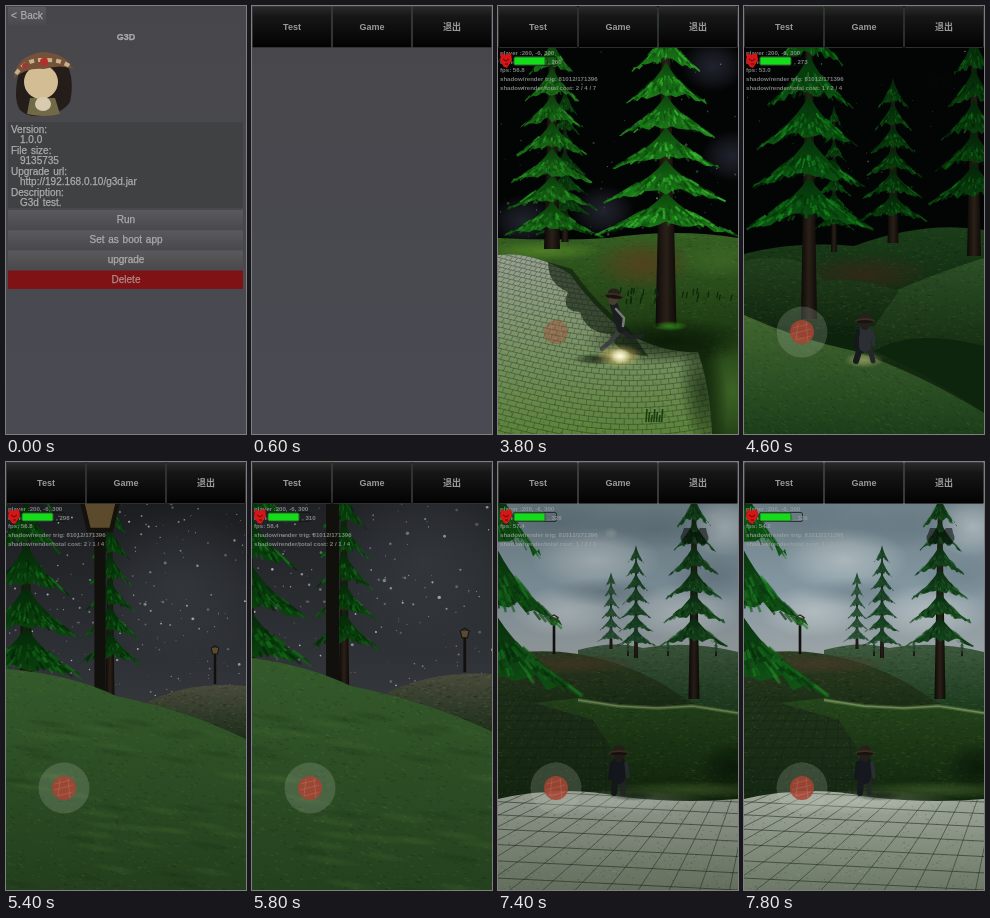
Write an HTML page with a canvas that moves like this. It is 240 by 428 pixels and loops after 8 s.

```html
<!DOCTYPE html>
<html lang="en">
<head>
<meta charset="utf-8">
<title>3D forest demo</title>
<style>
html, body { margin: 0; width: 100%; height: 100%; overflow: hidden; background: #48484e; }
canvas, svg { position: absolute; left: 0; top: 0; width: 100%; height: 100%; display: block; }
text { font-family: "Liberation Sans", Arial, sans-serif; white-space: pre; }
#menu text { font-size: 10px; word-spacing: 1px; fill: #acacae; stroke: #acacae; stroke-width: .25; }
#bar text { font: bold 9px "Liberation Sans", "Noto Sans CJK SC", "Noto Sans CJK", sans-serif; fill: #999; text-anchor: middle; }
#debug, #camera { font-size: 6.1px; font-weight: bold; fill: #a3a6a3; fill-opacity: .75; }
.mid { text-anchor: middle; }
</style>
</head>
<body>
<canvas id="scene" width="240" height="428"></canvas>
<svg viewBox="0 0 240 428">
  <defs>
    <linearGradient id="btn" x2="0" y2="1"><stop stop-color="#5a5a5d"/><stop offset="1" stop-color="#4a4a4d"/></linearGradient>
    <linearGradient id="tab" x2="0" y2="1"><stop stop-color="#2a2a2a"/><stop offset=".25" stop-color="#161616"/><stop offset="1" stop-color="#020202"/></linearGradient>
  </defs>
  <g id="menu">
    <rect x="2" y="1" width="38" height="18" rx="1" fill="url(#btn)"/>
    <text x="5" y="13">&lt; Back</text>
    <text x="120" y="34" class="mid" style="font-weight:bold;font-size:9px">G3D</text>
    <g id="doll">
      <path d="M14 62Q6 92 14 104Q24 113 38 109Q56 108 64 96Q69 72 60 57Z" fill="#251d1a"/>
      <path d="M24 92L49 92L54 108Q38 112 21 108Z" fill="#716a46"/>
      <ellipse cx="35" cy="76" rx="17" ry="17" fill="#d3bd94"/>
      <ellipse cx="37" cy="98" rx="8" ry="7" fill="#d9cbb0"/>
      <path d="M8 72Q10 50 36 46Q60 47 67 63Q55 58 38 63Q21 61 8 72Z" fill="#76513a"/>
      <path d="M10 68Q20 53 37 54Q54 53 65 61" fill="none" stroke="#c6b18a" stroke-width="4" stroke-dasharray="5 4"/>
      <circle cx="38" cy="56" r="4" fill="#b42e2b"/><circle cx="19" cy="60" r="3" fill="#9b3a32"/>
    </g>
    <rect x="2" y="116" width="235" height="86" fill="#404143"/>
    <g id="info"></g>
    <g id="buttons"></g>
  </g>
  <g id="hud">
    <g id="debug"></g>
    <rect x="15.5" y="50.5" width="43" height="9" rx="1.5" fill="none" stroke="#10160f" stroke-opacity=".7"/>
    <rect x="16" y="51" width="31" height="8" rx="1.5" fill="#14dc1b" stroke="#315b2e"/>
    <text id="camera" x="50" y="57.5"></text>
    <path d="M3 47L7 49L13 47L14 54L9 62L6 61L2 55Z" fill="#d51516"/>
    <path d="M5 53L8 55L11 53M7 58h3" stroke="#5d0909" fill="none"/>
    <g id="glass" fill="#050706" opacity=".55">
      <circle cx="189" cy="76" r="6.5"/><circle cx="204" cy="76" r="6.5"/><path d="M186 66h6l3 4h4l3-4h6l2 9h-27z"/>
    </g>
    <circle id="pad" cx="58" cy="326" r="25.5" fill="#b7beb0" fill-opacity=".22"/>
    <g id="knob">
      <circle cx="58" cy="326" r="12" fill="#a84332"/>
      <path d="M49 322L64 318M48 328L67 323M52 334L67 330M54 317L52 334M62 316L64 336" stroke="#d08070" stroke-opacity=".4"/>
    </g>
  </g>
  <g id="bar"></g>
</svg>
<script>
const $ = id => document.getElementById(id);
const ctx = $('scene').getContext('2d');

const random = seed => {
  let s = seed * 99991 + 17;
  return () => (s = s * 16807 % 2147483647) / 2147483647;
};

function fade(y0, y1, ...colors) {
  const g = ctx.createLinearGradient(0, y0, 0, y1);
  colors.forEach((c, i) => g.addColorStop(i / (colors.length - 1), c));
  return g;
}

function box(x, y, w, h, fill) {
  ctx.fillStyle = fill;
  ctx.fillRect(x, y, w, h);
}

function line(points, color, width = 1) {
  ctx.strokeStyle = color;
  ctx.lineWidth = width;
  ctx.beginPath();
  points.forEach(([x, y]) => ctx.lineTo(x, y));
  ctx.stroke();
}

function oval(x, y, rx, ry, color, tilt = 0) {
  ctx.fillStyle = color;
  ctx.beginPath();
  ctx.ellipse(x, y, rx, ry, tilt, 0, 7);
  ctx.fill();
}

// Soft-edged ellipse, colour given as "r,g,b"
function glow(x, y, rx, ry, rgb, alpha, tilt = 0) {
  ctx.save();
  ctx.translate(x, y);
  ctx.rotate(tilt);
  ctx.scale(rx, ry);
  const g = ctx.createRadialGradient(0, 0, 0, 0, 0, 1);
  g.addColorStop(0, `rgba(${rgb},${alpha})`);
  g.addColorStop(.5, `rgba(${rgb},${alpha * .6})`);
  g.addColorStop(1, `rgba(${rgb},0)`);
  ctx.fillStyle = g;
  ctx.fillRect(-1, -1, 2, 2);
  ctx.restore();
}

function stars(count, bottom, seed, bright) {
  const r = random(seed);
  for (let i = 0; i < count; i++) {
    const size = .4 + r() * r() * 1.2;
    oval(r() * 240, 42 + r() * (bottom - 42), size, size, `rgba(205,210,215,${bright * (.25 + r() * .75)})`);
  }
}

function inside(d, fill, paint) {
  const path = new Path2D(d);
  ctx.save();
  ctx.fillStyle = fill;
  ctx.fill(path);
  ctx.clip(path);
  paint();
  ctx.restore();
}

function grass(d, y0, y1, c0, c1, seed, lean = 0) {
  inside(d, fade(y0, y1, c0, c1), () => {
    const r = random(seed);
    for (let i = 0; i < 1300; i++) {
      const x = r() * 250 - 5, y = y0 + r() * (y1 - y0), len = 1 + r() * 3;
      line([[x, y], [x + len, y + lean * len]], r() > .5 ? 'rgba(0,10,0,.15)' : 'rgba(150,190,90,.09)', 1);
    }
  });
}

function paving(d, { y0, y1, c0, c1, rows, width, vanish = 120, power = 1.4, stagger = 0, bend = () => 0, slant = 0, ink = 'rgba(20,28,18,.38)' }) {
  inside(d, fade(y0, y1, c0, c1), () => {
    const rowY = k => y0 + (y1 - y0) * (k / rows) ** power;
    const grow = k => .45 + .55 * (k / rows) ** power;
    const column = (j, k) => vanish + j * width * grow(k) - slant * (k / rows) ** power;
    for (let k = 0; k <= rows; k++) {
      const pts = [];
      for (let x = -10; x <= 250; x += 10) pts.push([x, rowY(k) + bend(x)]);
      line(pts, ink, .9);
      const shift = stagger * (k % 2);
      for (let j = -50; j <= 50; j++) {
        const a = column(j + shift, k), b = column(j + shift, k + 1);
        if (a > -15 && a < 275) line([[a, rowY(k) + bend(a)], [b, rowY(k + 1) + bend(b)]], ink, .8);
      }
    }
    const r = random(rows);
    for (let i = 0; i < 900; i++)
      box(r() * 240, y0 - 20 + r() * (y1 - y0 + 20), 1.5, 1, r() > .5 ? 'rgba(230,240,215,.1)' : 'rgba(0,0,0,.16)');
  });
}

// Conifer: tapering trunk under overlapping, drooping skirts of needles
function tree({ x, top, low, base, half, tiers, trunk, hue = ['#0a3a0a', '#1b7219', '#30a42a'], seed = 1 }) {
  const r = random(seed), step = (low - top) / tiers;
  const g = ctx.createLinearGradient(x - trunk / 2, 0, x + trunk / 2, 0);
  ['#0b0907', '#2a2018', '#0d0a07'].forEach((c, i) => g.addColorStop(i / 2, c));
  ctx.fillStyle = g;
  ctx.beginPath();
  ctx.moveTo(x - trunk * .15, top); ctx.lineTo(x + trunk * .15, top);
  ctx.lineTo(x + trunk * .5, base); ctx.lineTo(x - trunk * .5, base);
  ctx.fill();
  for (let i = tiers; i >= 1; i--) {
    const y = top + step * i, h = step * 1.35, w = half * (.3 + .7 * i / tiers);
    const hem = u => y - h * .24 * (1 - u * u);
    // A needle bough hanging outwards from the spine
    const bough = (u, s) => [x + u * w * s, y - h + (hem(u) - y + h) * s ** .75];
    ctx.beginPath();
    ctx.moveTo(x, y - h);
    ctx.quadraticCurveTo(x - w * .25, y - h * .5, x - w * .92, y - h * .06);
    for (let u = -.88; u <= .88; u += .11) ctx.lineTo(x + u * w, hem(u) + (r() - .7) * h * .16);
    ctx.lineTo(x + w * .92, y - h * .06);
    ctx.quadraticCurveTo(x + w * .25, y - h * .5, x, y - h);
    ctx.fillStyle = fade(y - h, y, hue[0], hue[1]);
    ctx.fill();
    const count = 30 + w * 1.6;
    for (let j = 0; j < count; j++) {
      const u = r() * 2 - 1, s = .3 + r() * .6;
      ctx.globalAlpha = .25 + r() * .45;
      line([bough(u, s), bough(u, s + .14)], hue[Math.floor(r() * 3)], .7 + w / 45);
    }
    ctx.globalAlpha = 1;
  }
}

function lamp(x, top, base, s) {
  box(x - s, top, s * 2, base - top, '#11100d');
  ctx.fillStyle = '#5b4b2c';
  ctx.beginPath();
  [[-3, -5], [3, -5], [2, 0], [-2, 0]].forEach(([a, b]) => ctx.lineTo(x + a * s, top + b * s));
  ctx.fill();
  line([[x - 3.2 * s, top - 5 * s], [x - 2 * s, top], [x + 2 * s, top], [x + 3.2 * s, top - 5 * s], [x, top - 7 * s], [x - 3.2 * s, top - 5 * s]], '#15120e', s * .8);
}

function hat(x, y, tilt = 0) {
  oval(x, y - 3, 6, 4.5, '#28211b', tilt);
  oval(x, y, 10, 2.8, '#3c3025', tilt);
  oval(x, y + .8, 8.5, 1.8, '#18130f', tilt);
}

function runner(swing) {
  const lean = 4 * Math.max(0, swing - .5), hip = [121 + lean, 323], neck = [118 - lean, 299];
  glow(100, 353, 26, 6, '0,8,0', .7);
  ctx.lineCap = ctx.lineJoin = 'round';
  line([hip, [123 + 9 * swing, 334 - 3 * swing], [124 + 20 * swing, 346 - 16 * swing]], '#202226', 4.5);
  line([hip, [119 - 7 * swing, 336], [119 - 15 * swing, 349 - 6 * swing]], '#3c3f40', 4.5);
  line([neck, hip], '#1c1d21', 8);
  line([[neck[0] + 2, 303], [124 + lean, 312], [118 + 7 * swing, 320]], '#777b78', 2.5);
  oval(neck[0] - 1, 294, 4.5, 5, '#4b3d31');
  hat(neck[0], 290, .12);
  ctx.lineCap = 'butt';
}

function walker(y, coat, stride = 0) {
  ctx.lineCap = ctx.lineJoin = 'round';
  line([[117, y - 18], [116 - stride, y - 2]], '#16191d', 6);
  line([[125, y - 18], [125 + stride, y - 2]], '#24272a', 5);
  line([[121, y - 33], [121, y - 17]], coat, 12);
  line([[114, y - 32], [112, y - 17]], '#14171b', 4);
  line([[128, y - 32], [130, y - 18]], '#2b2f35', 3.5);
  oval(121, y - 39, 5, 6, '#241e19');
  hat(121, y - 42);
  ctx.lineCap = 'butt';
}

function courtyard({ swing, flash }) {
  box(0, 0, 240, 428, '#030404');
  [[105, 205], [235, 150], [25, 215], [215, 60]].forEach(([x, y]) => glow(x, y, 32, 26, '75,82,105', .4));
  stars(75, 235, 4, .5);
  grass('M0 232Q60 235 110 232Q180 222 240 232V428H0Z', 228, 350, '#355f22', '#18330f', 5);
  glow(145, 258, 50, 26, '88,62,28', .85);
  glow(222, 255, 45, 20, '75,120,45', .4);
  tree({ x: 67, top: 90, low: 231, base: 236, half: 32, tiers: 7, trunk: 7, hue: ['#06260a', '#0d430f', '#186119'], seed: 9 });
  glow(45, 245, 60, 10, '95,150,40', .6);
  glow(235, 385, 35, 60, '80,125,50', .65);
  paving('M0 249Q36 245 72 268Q92 297 125 325Q165 348 200 346Q212 380 214 428H0Z',
    { y0: 235, y1: 430, c0: '#9ba396', c1: '#5a8239', rows: 38, width: 10, stagger: .5, power: 1.1, slant: 20, bend: x => 22 * Math.sin(x / 85) });
  inside('M50 256L74 263Q98 298 130 322L150 350Q118 349 112 328Q88 327 82 306Q62 305 70 286Q50 278 50 256Z', 'rgba(14,26,12,.62)', () => {});
  glow(170, 335, 85, 24, '6,18,4', .75);
  glow(205, 385, 24, 62, '12,28,8', .65, -.12);
  tree({ x: 54, top: 16, low: 232, base: 243, half: 53, tiers: 8, trunk: 16, seed: 2 });
  tree({ x: 168, top: 2, low: 230, base: 321, half: 73, tiers: 7, trunk: 21, hue: ['#0b440b', '#1e841c', '#3cbc32'], seed: 3 });
  glow(172, 320, 18, 5, '50,150,25', .8);
  const r = random(12);
  for (let i = 0; i < 26; i++) {
    const x = r() * 125 + 110, y = 287 + r() * 12;
    line([[x, y], [x + 1, y - 6]], '#0b280a', 1.3);
  }
  for (let i = 0; i < 7; i++) line([[148 + i * 2.6, 416], [149 + i * 2.6, 403 + i % 3 * 3]], '#153c0e', 1.5);
  runner(swing);
  if (flash) {
    glow(121, 350, 24, 12, '235,200,110', .7);
    glow(122, 350, 11, 8, '255,255,225', 1);
  }
}

function woods() {
  const dim = ['#042208', '#0a430d', '#137019'];
  box(0, 0, 240, 428, '#030504');
  stars(40, 200, 8, .5);
  grass('M0 248Q50 235 110 240Q180 214 240 224V428H0Z', 222, 330, '#1b3d19', '#0c220c', 3);
  tree({ x: 90, top: 105, low: 225, base: 246, half: 22, tiers: 7, trunk: 6, hue: dim, seed: 5 });
  glow(120, 268, 70, 20, '52,40,24', .85);
  grass('M120 300Q165 276 240 252V428H120Z', 252, 360, '#2c5026', '#12280f', 11);
  grass('M0 255Q60 243 80 275Q110 270 155 285L130 320H0Z', 248, 330, '#23411d', '#0f240e', 10);
  tree({ x: 149, top: 80, low: 217, base: 237, half: 38, tiers: 6, trunk: 11, hue: dim, seed: 6 });
  tree({ x: 230, top: 40, low: 200, base: 250, half: 50, tiers: 5, trunk: 14, hue: dim, seed: 14 });
  tree({ x: 65, top: -20, low: 226, base: 313, half: 70, tiers: 6, trunk: 16, hue: ['#05300a', '#0c5711', '#189020'], seed: 7 });
  grass('M0 309Q50 332 110 345Q175 367 240 407V428H0Z', 309, 428, '#41662f', '#1c3f1a', 12, .5);
  inside('M130 345Q170 322 240 340V406Q180 366 130 345Z', '#0d250c', () => {});
  glow(120, 354, 20, 8, '190,185,125', .6);
  walker(357, '#2b2f34', 4);
}

function hillside() {
  box(0, 0, 240, 428, fade(42, 240, '#1b1d21', '#33363a'));
  glow(175, 125, 90, 80, '75,80,85', .35);
  stars(240, 240, 21, .8);
  const dim = ['#052508', '#0b470f', '#157019'];
  tree({ x: 104, top: 20, low: 204, base: 235, half: 34, tiers: 7, trunk: 9, hue: dim, seed: 15 });
  grass('M143 239Q185 219 240 224V280H143Z', 220, 280, '#4b4d3d', '#1a2b18', 16);
  lamp(209, 192, 222, 1.2);
  tree({ x: 20, top: 10, low: 221, base: 240, half: 66, tiers: 5, trunk: 14, hue: dim, seed: 8 });
  lamp(94, 68, 235, 5.6);
  grass('M0 207Q65 212 110 234Q180 248 240 277V428H0Z', 207, 428, '#345a2b', '#233f1d', 17, .35);
  const r = random(24);
  for (let i = 0; i < 45; i++) glow(r() * 240, 260 + r() * 168, 25, 4, r() > .5 ? '85,125,55' : '8,30,8', .18, .15);
}

function valley({ day, drift = 0, stride = 0 }) {
  const storm = .2 + .45 * (1 - day);
  box(0, 0, 240, 428, fade(42, 205, '#6d7f87', '#8397a1', '#a0a5a6'));
  [[100, 98, 65, 32], [185, 150, 60, 28], [70, 150, 55, 26], [228, 65, 40, 30]].forEach(([x, y, a, b]) => glow(x + drift, y, a, b, '200,208,210', .6));
  [[60, 62, 85, 24], [160, 67, 70, 22], [110, 130, 55, 15], [220, 115, 50, 25]].forEach(([x, y, a, b]) => glow(x + drift * 1.5, y, a, b, '62,78,90', storm));
  glow(115 + drift, 71, 7, 6, '245,245,235', .8 * (1 - day));
  grass('M80 188Q115 178 145 186Q190 178 240 190V250H80Z', 180, 250, '#3f5a40', '#1b3a1c', 30);
  const far = ['#23442f', '#2c5637', '#3d6b44'];
  [[130, 178, 3], [170, 180, 3], [218, 182, 4]].forEach(([x, top, half], i) => tree({ x, top, low: 190, base: 194, half, tiers: 3, trunk: 2, hue: far, seed: 40 + i }));
  tree({ x: 113, top: 114, low: 180, base: 187, half: 14, tiers: 6, trunk: 3, hue: far, seed: 31 });
  tree({ x: 138, top: 88, low: 185, base: 196, half: 21, tiers: 7, trunk: 4, hue: ['#143820', '#1f4c2a', '#2e6637'], seed: 32 });
  grass('M0 193Q60 183 110 199Q155 212 190 239L240 260V290H0Z', 188, 265, '#2f3d24', '#12270f', 33);
  glow(75, 202, 70, 10, '74,56,38', .7);
  lamp(56, 162, 192, 1.3);
  grass('M80 236Q145 250 190 244Q215 246 240 250V345H0V245Z', 238, 335, '#24451b', '#12260d', 34);
  [[4, .25], [1.6, .55]].forEach(([width, alpha]) =>
    line([[80, 238], [120, 244], [160, 246], [195, 244], [240, 251]], `rgba(150,175,115,${alpha})`, width));
  paving('M0 232Q35 240 95 258L145 336H0Z', { y0: 230, y1: 340, c0: '#20331a', c1: '#142711', rows: 13, width: 18, slant: -25 });
  glow(235, 305, 35, 26, '5,20,5', .7);
  tree({ x: 196, top: 18, low: 186, base: 237, half: 37, tiers: 7, trunk: 11, hue: ['#0a2811', '#184c1f', '#256b2c'], seed: 35 });
  tree({ x: -6, top: 30, low: 240, base: 330, half: 100, tiers: 3, trunk: 12, hue: ['#08300d', '#125817', '#1f8023'], seed: 36 });
  glow(190, 328, 90, 9, '70,100,45', .6);
  paving('M0 337Q65 322 125 335Q185 342 240 337V428H0Z',
    { y0: 318, y1: 440, c0: '#a7aea3', c1: '#66735f', rows: 9, width: 32, vanish: 195, power: 1.35, slant: 95, bend: x => (x - 120) * .05, ink: 'rgba(22,34,20,.6)' });
  glow(115, 340, 100, 12, '205,212,200', .35);
  glow(135, 334, 24, 5, '0,10,0', .5);
  walker(333, '#15191f', stride);
  box(0, 42, 240, 386, `rgba(5,9,8,${.4 * (1 - day)})`);
}

const steps = [
  { at: 0, menu: true },
  { at: 600, loading: true },
  { at: 2600, draw: courtyard, swing: .72, fps: '34.8', cost: '1 / 1 / 3', cam: 260 },
  { at: 3000, draw: courtyard, swing: -.35, fps: '48.2', cost: '2 / 2 / 5', cam: 260 },
  { at: 3400, draw: courtyard, swing: .5, fps: '52.4', cost: '1 / 3 / 5', cam: 260 },
  { at: 3800, draw: courtyard, swing: 1, flash: true, fps: '56.8', cost: '2 / 4 / 7', cam: 260 },
  { at: 4200, draw: woods, zoom: 1.12, pan: 12, fps: '55.2', cost: '1 / 2 / 5', cam: 266 },
  { at: 4600, draw: woods, fps: '53.0', cost: '1 / 2 / 4', cam: 273 },
  { at: 5000, draw: woods, zoom: 1.18, pan: -18, fps: '54.6', cost: '2 / 2 / 4', cam: 285 },
  { at: 5400, draw: hillside, fps: '56.8', cost: '2 / 1 / 4', cam: 298 },
  { at: 5800, draw: hillside, zoom: 1.15, pan: -16, fps: '58.4', cost: '2 / 1 / 4', cam: 310 },
  { at: 6200, draw: valley, day: .05, drift: -12, stride: 3, zoom: 1.1, pan: 10, fps: '61.2', cost: '2 / 2 / 4', cam: 320 },
  { at: 6600, draw: valley, day: .3, drift: -8, stride: 2, fps: '64.0', cost: '2 / 2 / 4', cam: 326 },
  { at: 7000, draw: valley, day: .53, drift: -5, fps: '60.6', cost: '1 / 2 / 4', cam: 326 },
  { at: 7400, draw: valley, day: .77, drift: -2, fps: '57.4', cost: '1 / 2 / 3', cam: 326 },
  { at: 7800, draw: valley, day: 1, fps: '54.2', cost: '1 / 2 / 3', cam: 326 }
];

$('info').innerHTML = ['Version:', '1.0.0', 'File size:', '9135735', 'Upgrade url:', 'http://192.168.0.10/g3d.jar', 'Description:', 'G3d test.']
  .map((s, i) => `<text x="${i % 2 ? 14 : 5}" y="${126.5 + i * 10.5}">${s}</text>`).join('');
$('buttons').innerHTML = ['Run', 'Set as boot app', 'upgrade', 'Delete'].map((s, i) => {
  const y = 204 + i * 20.2, red = i === 3;
  return `<rect x="2" y="${y}" width="235" height="18.5" rx="1" fill="${red ? '#7e1214' : 'url(#btn)'}"/>
    <text x="120" y="${y + 12.5}" class="mid"${red ? ' style="fill:#b08a89;stroke:#b08a89"' : ''}>${s}</text>`;
}).join('');
$('bar').innerHTML = ['Test', 'Game', '退出'].map((s, i) =>
  `<rect x="${i * 80 + .5}" y=".5" width="79" height="41" rx="1" fill="url(#tab)" stroke="#383838" stroke-width=".8"/>
  <text x="${i * 80 + 40}" y="24">${s}</text>`).join('');

const show = (id, on) => $(id).style.display = on ? '' : 'none';

function render(step) {
  const playing = !!step.draw, open = playing && step.draw !== courtyard;
  show('menu', step.menu);
  show('bar', !step.menu);
  show('hud', playing);
  show('pad', open);
  show('glass', open && step.draw !== hillside);
  box(0, 0, 240, 428, fade(0, 428, '#47474b', '#4a4a53'));
  if (!playing) return;
  ctx.save();
  const zoom = step.zoom || 1;
  ctx.translate(120 + (step.pan || 0) * .6, 300);
  ctx.scale(zoom, zoom);
  ctx.translate(-120, -300);
  step.draw(step);
  ctx.restore();
  $('knob').setAttribute('opacity', open ? .85 : .4);
  $('camera').textContent = ', ' + step.cam;
  $('debug').innerHTML = [`player :${open ? 200 : 260}, -6, 300`, 'camera', 'fps: ' + step.fps,
    'shadow/render trig: 81012/171396', 'shadow/render/total cost: ' + step.cost]
    .map((s, i) => `<text x="2" y="${49 + i * 8.7}">${s}</text>`).join('');
}

const start = performance.now();
let current;
function tick() {
  const t = (performance.now() - start) % 8000;
  const step = steps.filter(s => s.at <= t).pop();
  if (step !== current) render(current = step);
  requestAnimationFrame(tick);
}
tick();
</script>
</body>
</html>
```
